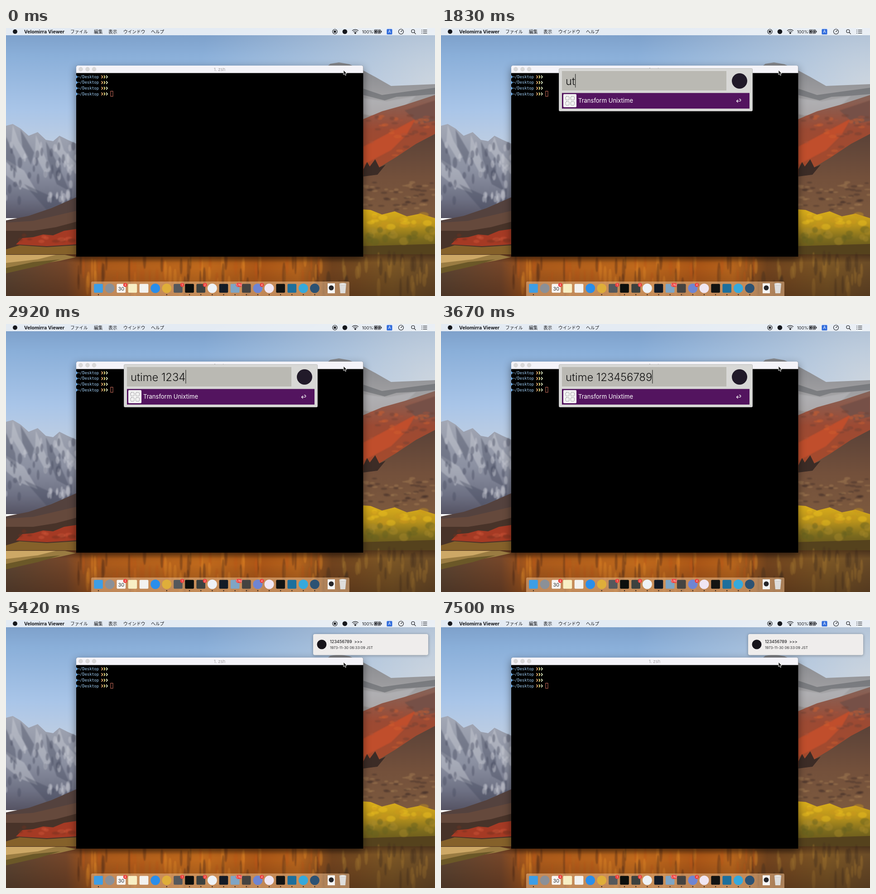
Animation of 947x592 px, one loop 7.58 s. Source, as an HTML page:

```html
<!DOCTYPE html>
<html lang="ja">
<head>
<meta charset="utf-8">
<title>Unixtime workflow</title>
<style>
  html, body { margin: 0; width: 100%; height: 100%; overflow: hidden; }
  svg { display: block; width: 947px; height: 592px; font-family: Inter, "Noto Sans CJK JP", sans-serif; }
  .menu { font-size: 9.7px; fill: #15171c; }
  .menu .app { font-size: 10.6px; font-weight: 700; }
  .menu .jp { font-family: "Noto Sans CJK JP", sans-serif; font-weight: 500; }
  .line { fill: none; stroke: #15171c; stroke-width: 1.1; }
  .term { font: 8.7px "DejaVu Sans Mono", monospace; fill: #a2d2fa; }
  .chev { fill: none; stroke-width: 1.7; }
  .window { filter: drop-shadow(0 6px 9px #0007); }
  .soft { filter: blur(1.2px); }
  #panel, #row { visibility: hidden; }
  #panel.on, #row.on { visibility: visible; }
  #query { font-size: 23.8px; font-weight: 300; fill: #111; white-space: pre; }
  #note { animation: slide 7.58s infinite; filter: drop-shadow(0 1px 3px #0005); }
  @keyframes slide {
    0%, 57.3% { transform: translateX(275px); animation-timing-function: ease; }
    63.8%, 100% { transform: none; }
  }
</style>
</head>
<body>
<svg viewBox="0 0 947 592">
  <defs>
    <linearGradient id="sky" x2="0" y2="1">
      <stop offset="0" stop-color="#7a9cc6"/><stop offset=".2" stop-color="#8aafd9"/>
      <stop offset=".6" stop-color="#a9c5e8"/><stop offset="1" stop-color="#c9d2df"/>
    </linearGradient>
    <radialGradient id="haze" gradientUnits="userSpaceOnUse" cx="947" cy="135" r="520">
      <stop offset="0" stop-color="#d6dade" stop-opacity=".85"/>
      <stop offset=".4" stop-color="#cdd5de" stop-opacity=".5"/>
      <stop offset="1" stop-color="#cdd5de" stop-opacity="0"/>
    </radialGradient>
    <linearGradient id="rock" x2="0" y2="1">
      <stop offset="0" stop-color="#a3a8b5"/><stop offset=".5" stop-color="#8b90a1"/>
      <stop offset=".8" stop-color="#6d7083"/><stop offset="1" stop-color="#555363"/>
    </linearGradient>
    <linearGradient id="snow" x2="0" y2="1">
      <stop offset="0" stop-color="#85878c"/><stop offset=".5" stop-color="#a3a2a4"/>
      <stop offset="1" stop-color="#8a7a73"/>
    </linearGradient>
    <linearGradient id="slope" x2="0" y2="1">
      <stop offset="0" stop-color="#85645a"/><stop offset=".4" stop-color="#9c4a33"/>
      <stop offset="1" stop-color="#a84a2a"/>
    </linearGradient>
    <linearGradient id="hill" x2="0" y2="1">
      <stop offset="0" stop-color="#5a4238"/><stop offset=".5" stop-color="#73503b"/>
      <stop offset="1" stop-color="#7d5a3e"/>
    </linearGradient>
    <linearGradient id="bush" x2="0" y2="1">
      <stop offset="0" stop-color="#dcaf1a"/><stop offset=".35" stop-color="#b9931c"/>
      <stop offset=".65" stop-color="#7c6b1e"/><stop offset="1" stop-color="#5c4b1a"/>
    </linearGradient>
    <linearGradient id="water">
      <stop offset="0" stop-color="#5d4634"/><stop offset=".14" stop-color="#76472a"/>
      <stop offset=".2" stop-color="#b05c1c"/><stop offset=".46" stop-color="#c96f1e"/>
      <stop offset=".6" stop-color="#b25a18"/><stop offset=".68" stop-color="#c06a1e"/>
      <stop offset=".76" stop-color="#74451f"/><stop offset=".9" stop-color="#7d5826"/>
      <stop offset="1" stop-color="#6b4c28"/>
    </linearGradient>
    <linearGradient id="depth" x2="0" y2="1">
      <stop offset="0" stop-color="#2a1810" stop-opacity=".5"/><stop offset=".2" stop-color="#2a1810" stop-opacity="0"/>
      <stop offset="1" stop-color="#2a1810" stop-opacity=".35"/>
    </linearGradient>
    <g id="prompt">
      <path d="M155-6.5l3.6 3.7-3.6 3.7z" fill="#69aef0"/>
      <text class="term" x="158">~/Desktop</text>
      <path class="chev" d="M210.8-5.9l2.600 3.100-2.600 3.100" stroke="#f7b676"/>
      <path class="chev" d="M216-5.9l2.600 3.100-2.600 3.100" stroke="#f8ec86"/>
      <path class="chev" d="M221.200-5.9l2.600 3.100-2.600 3.100" stroke="#eefad2"/>
    </g>
  </defs>

  <!-- wallpaper -->
  <rect width="947" height="300" fill="url(#sky)"/>
  <rect width="947" height="300" fill="url(#haze)"/>
  <path d="M0 216L15 212 32 222 50 238 70 230 88 247 104 250 118 238 136 247 170 262V420H0z" fill="url(#rock)"/>
  <g class="soft" fill="#d0d3da" opacity=".4">
    <path d="M15 214L28 250 50 285 36 290 12 250zM118 240L128 270 155 300 140 312 108 270zM66 236L82 275 100 318 84 318 64 280zM0 290L40 315 70 365 30 350 0 325z"/>
  </g>
  <g class="soft" fill="#454a5e" opacity=".4">
    <path d="M32 224L62 275 55 302 36 262zM88 250L114 300 140 360 112 345 92 290zM0 240L20 285 24 320 0 295zM40 345L100 372 155 376 90 402z"/>
  </g>
  <g id="crags" class="soft"></g>
  <path d="M0 425L50 415 100 398 155 374 180 374V500H0z" fill="#54423e"/>
  <path d="M0 430L60 426 155 404V450L0 462z" fill="#65493c"/>
  <path d="M0 448L60 448 110 440 155 428V500H0z" fill="#483329"/>
  <path d="M22 478L36 464 60 462 82 456 104 458 128 448 155 444V478L90 482z" fill="#a53a24"/>
  <path d="M0 489L30 480 90 484 155 480V501H0z" fill="#85612a"/>

  <path d="M700 92L716 79 735 76 758 80 789 94 815 108 850 128 947 124V230L760 250z" fill="url(#snow)"/>
  <path d="M789 134L830 148 880 141 947 132V146L900 150 862 152 836 160 789 148z" fill="#50555a" opacity=".45"/>
  <path class="soft" d="M789 155L840 162 905 150 875 178 820 198 789 190z" fill="#bcbcc0" opacity=".5"/>
  <path d="M780 205L830 184 880 170 947 148V340H780z" fill="url(#slope)"/>
  <g class="soft">
    <path d="M789 262L845 232 905 200 884 236 850 270 789 302z" fill="#c04e2c"/>
    <path d="M880 182L947 160V205L912 212z" fill="#765047"/>
  </g>
  <g id="shrubs" class="soft"></g>
  <path d="M780 328L820 310 860 286 905 256 947 234V425H780z" fill="url(#hill)"/>
  <path d="M789 312L797 296 803 306 815 290 824 308 838 302 820 324 789 328z" fill="#3c2c26"/>
  <g id="scrub" class="soft"></g>
  <path d="M780 400L805 402 830 412 858 405 885 416 915 410 947 420V502H780z" fill="url(#bush)"/>
  <path d="M780 482L947 477V502H780z" fill="#55421d"/>
  <g id="leaves" class="soft"></g>

  <rect y="500" width="947" height="92" fill="url(#water)"/>
  <g id="streaks" class="soft"></g>
  <rect y="500" width="947" height="92" fill="url(#depth)"/>
  <path d="M0 501H130L155 506 120 514 60 524 0 541z" fill="#9a7c42"/>
  <path d="M0 501H110L70 511 0 519z" fill="#cda866"/>
  <path d="M0 530L60 517 120 511 70 526 0 542z" fill="#6b5828"/>

  <!-- menu bar -->
  <rect width="947" height="16" fill="#f3f6fa" opacity=".88"/>
  <g class="menu">
    <circle cx="20" cy="8" r="5"/>
    <text class="app" x="40" y="11.7">Velomirra Viewer</text>
    <g class="jp">
      <text x="142" y="11.6">ファイル</text><text x="194" y="11.6">編集</text><text x="226" y="11.6">表示</text>
      <text x="259" y="11.6">ウインドウ</text><text x="320" y="11.6">ヘルプ</text>
    </g>
    <circle class="line" cx="726" cy="8" r="5.2"/><rect x="723.5" y="5.5" width="5" height="5" rx=".6"/>
    <circle cx="748" cy="8" r="5.3"/>
    <path class="line" d="M764 6.2a10 10 0 0 1 14 0M766.4 8.6a6.5 6.5 0 0 1 9.2 0"/>
    <path d="M768.4 10.6a3.6 3.6 0 0 1 5.2 0L771 13.4z"/>
    <text x="786" y="11.5" font-size="9.3">100%</text>
    <rect class="line" x="813" y="4" width="14" height="8" rx="1.4"/><rect x="814.5" y="5.5" width="11" height="5"/>
    <path d="M828 6.5h1.4v3H828z"/><path d="M821.5 3.6l-4 5h3l-1 4 4.3-5.2h-3z" stroke="#eef2f7" stroke-width=".8"/>
    <rect x="840.5" y="2.2" width="12" height="12" rx="1.5" fill="#2f6bdc"/>
    <text x="846.5" y="11.4" font-size="9" text-anchor="middle" style="fill:#fff">A</text>
    <circle class="line" cx="872" cy="8" r="5.5"/><path class="line" d="M872 8l2.8-2.8M872 8h-1"/>
    <circle class="line" cx="898.5" cy="7" r="3.5"/><path class="line" d="M901 9.6l3.6 3.8"/>
    <path class="line" d="M920.5 4.5h9M920.5 8h9M920.5 11.5h9M917 4.5h1.6M917 8h1.6M917 11.5h1.6"/>
  </g>

  <!-- terminal -->
  <g class="window">
    <path d="M155 505V86.5a3.5 3.5 0 0 1 3.5-3.5H785a3.5 3.5 0 0 1 3.5 3.5V505z"/>
    <path d="M155 99.5V86.5a3.5 3.5 0 0 1 3.5-3.5H785a3.5 3.5 0 0 1 3.5 3.5V99.5z" fill="#f4f3f8"/>
  </g>
  <g fill="#d9d8d8" stroke="#c8c6c8" stroke-width=".5">
    <circle cx="165" cy="91" r="4.4"/><circle cx="180" cy="91" r="4.4"/><circle cx="194.5" cy="91" r="4.4"/>
  </g>
  <text x="471.5" y="94.7" font-size="9.6" text-anchor="middle" fill="#a5a2a5">1. zsh</text>
  <use href="#prompt" y="110.8"/><use href="#prompt" y="123.3"/>
  <use href="#prompt" y="135.9"/><use href="#prompt" y="148.5"/>
  <rect x="231" y="139.5" width="5" height="11.5" fill="none" stroke="#d0705e"/>

  <!-- dock -->
  <rect x="188" y="560" width="570" height="34" rx="3" fill="#e6b584" opacity=".6"/>
  <path d="M700.5 564v23" stroke="#9a7350" opacity=".6"/>
  <g id="dock"></g>
  <rect x="710" y="564" width="16" height="22" fill="#f6f6f6"/><circle cx="718" cy="574" r="5.5" fill="#26262a"/>
  <path d="M736 565h15l-2 21h-11z" fill="#dedddc"/>
  <ellipse cx="743.5" cy="565.5" rx="7.8" ry="2" fill="#f4f3f1" stroke="#aaa6a2" stroke-width=".6"/>

  <!-- launcher -->
  <g id="panel">
    <rect id="frame" x="260.5" y="89.5" width="427" height="54" rx="2" fill="#d8d8d6" stroke="#b9b9b9"/>
    <rect x="267" y="95" width="363" height="43" fill="#bab9b3"/>
    <circle cx="659" cy="117" r="17" fill="#211a29"/>
    <text id="query" x="275" y="126"></text>
    <rect id="caret" x="274.5" y="101.5" width="1.1" height="30" fill="#222"/>
    <g id="row">
      <rect x="267" y="143.5" width="414" height="34.5" fill="#53145f"/>
      <rect x="270" y="146" width="29" height="29" rx="2" fill="#f2f2f2"/>
      <g fill="none" stroke="#77747a" stroke-dasharray="2 1.3">
        <rect x="275" y="151" width="8" height="8" rx="2"/><rect x="286.5" y="151" width="8" height="8" rx="2"/>
        <rect x="275" y="162.5" width="8" height="8" rx="2"/><rect x="286.5" y="162.5" width="8" height="8" rx="2"/>
      </g>
      <text x="303" y="165" font-size="13" fill="#fff">Transform Unixtime</text>
      <path d="M655.5 158.5l-3 3 3 3M653 161.5h6.5a2.2 2.2 0 0 0 0-4.4h-1.5" fill="none" stroke="#fff" stroke-width="1.2"/>
    </g>
  </g>

  <!-- notification -->
  <g id="note">
    <rect x="678" y="31" width="254" height="46.5" rx="4" fill="#efedec"/>
    <circle cx="697" cy="54" r="10.5" fill="#17141a"/>
    <text x="715" y="51.3" font-size="9.1" font-weight="500" fill="#262628" style="white-space:pre">123456789  &gt;&gt;&gt;</text>
    <text x="715" y="63.5" font-size="8" fill="#303032">1973-11-30 06:33:09 JST</text>
  </g>

  <path d="M745 93v10.2l2.3-2.1 1.6 3.7 1.9-.8-1.6-3.6h3z" fill="#111" stroke="#fff" stroke-width=".9"/>
</svg>
<script>
  const $ = id => document.getElementById(id);
  const LOOP = 7580, OPEN = 1000, CLOSE = 4250;
  const QUERY = 'utime 123456789';

  function add(parent, name, attrs, text = '') {
    const el = document.createElementNS('http://www.w3.org/2000/svg', name);
    for (const key in attrs) el.setAttribute(key, attrs[key]);
    el.textContent = text;
    parent.append(el);
  }

  let seed = 7;
  const rand = (a, b) => {
    seed = seed * 16807 % 2147483647;
    return a + (b - a) * seed / 2147483647;
  };

  function scatter(id, count, [x0, x1], [y0, y1], [rx, ry], colors) {
    for (let i = 0; i < count; i++) add($(id), 'ellipse', {
      cx: rand(x0, x1), cy: rand(y0, y1), rx: rand(rx / 2, rx), ry: rand(ry / 2, ry),
      fill: colors[i % colors.length], opacity: .45
    });
  }
  scatter('crags', 60, [0, 155], [258, 385], [5, 12], ['#c9ccd4', '#4b5064']);
  scatter('shrubs', 50, [800, 947], [192, 290], [9, 4], ['#d0602f', '#6e4034', '#a8523a']);
  scatter('scrub', 60, [789, 947], [338, 402], [8, 3], ['#a77e55', '#45302a']);
  scatter('leaves', 18, [795, 947], [412, 440], [12, 7], ['#f0c41f', '#c9961c']);
  scatter('leaves', 20, [795, 947], [445, 475], [11, 9], ['#63601f', '#a88a2a']);
  scatter('leaves', 12, [30, 150], [456, 476], [10, 5], ['#d0573a', '#71301f']);
  scatter('streaks', 80, [160, 700], [508, 580], [4, 30], ['#ec8e28', '#5c3018', '#c45c18']);
  scatter('streaks', 30, [700, 947], [508, 580], [5, 24], ['#a87a30', '#4a3420']);

  // colour, shape, running dot, badge
  const icons = [
    ['#3d9ee6', 'sq', 1], ['#8b9097', 'o', 0], ['#f7f6f4', 'sq', 0, '4'], ['#f8efc4', 'sq', 0],
    ['#f3f2f0', 'sq', 0], ['#2a8eea', 'o', 0], ['#dfae3a', 'o', 1], ['#55585c', 'sq', 0, '1'],
    ['#0c0f0d', 'sq', 1], ['#3c413f', 'sq', 1, '2'], ['#eef2f6', 'o', 1], ['#131b26', 'sq', 1],
    ['#7fa5c4', 'sq', 1, '1,782'], ['#454341', 'sq', 1], ['#6f85d2', 'o', 1, '4'], ['#f0e6f2', 'o', 1],
    ['#121312', 'sq', 1], ['#1d6f9c', 'sq', 1], ['#36a9dc', 'o', 1], ['#2c5273', 'o', 1]
  ];
  const dock = $('dock');
  icons.forEach(([fill, shape, running, badge], i) => {
    const x = 204 + i * 25.13, y = 575;
    if (shape === 'o') add(dock, 'circle', { cx: x, cy: y, r: 10.5, fill });
    else add(dock, 'rect', { x: x - 9.8, y: y - 9.8, width: 19.6, height: 19.6, rx: 2, fill });
    if (i === 2) add(dock, 'text', { x, y: 580, 'font-size': 11, 'text-anchor': 'middle', fill: '#333' }, '30');
    if (running) add(dock, 'circle', { cx: x, cy: 589, r: 1.2, fill: '#33251b' });
    if (badge) {
      const w = badge.length > 1 ? 14 : 9;
      add(dock, 'rect', { x: x + 9 - w / 2, y: 563, width: w, height: 9, rx: 4.5, fill: '#ec3f3c' });
      add(dock, 'text', { x: x + 9, y: 569.6, 'font-size': 5.5, 'text-anchor': 'middle', fill: '#fff' }, badge);
    }
  });

  // "utime " is typed first, then the digits follow at a quicker pace
  function typedCount(t) {
    const word = Math.min(6, Math.floor((t - 1580) / 150) + 1);
    const digits = Math.min(9, Math.floor((t - 2580) / 105) + 1);
    return Math.max(0, word) + Math.max(0, digits);
  }

  let shown = -1;
  function draw(now) {
    const t = now % LOOP;
    const open = t >= OPEN && t < CLOSE;
    const count = open ? typedCount(t) : 0;
    $('panel').classList.toggle('on', open);
    $('row').classList.toggle('on', count > 0);
    if (count !== shown) {
      shown = count;
      $('query').textContent = QUERY.slice(0, count);
      $('frame').setAttribute('height', count ? 94 : 54);
      $('caret').setAttribute('x', 274.5 + (count ? $('query').getComputedTextLength() + .5 : 0));
    }
    requestAnimationFrame(draw);
  }
  requestAnimationFrame(draw);
</script>
</body>
</html>
```
